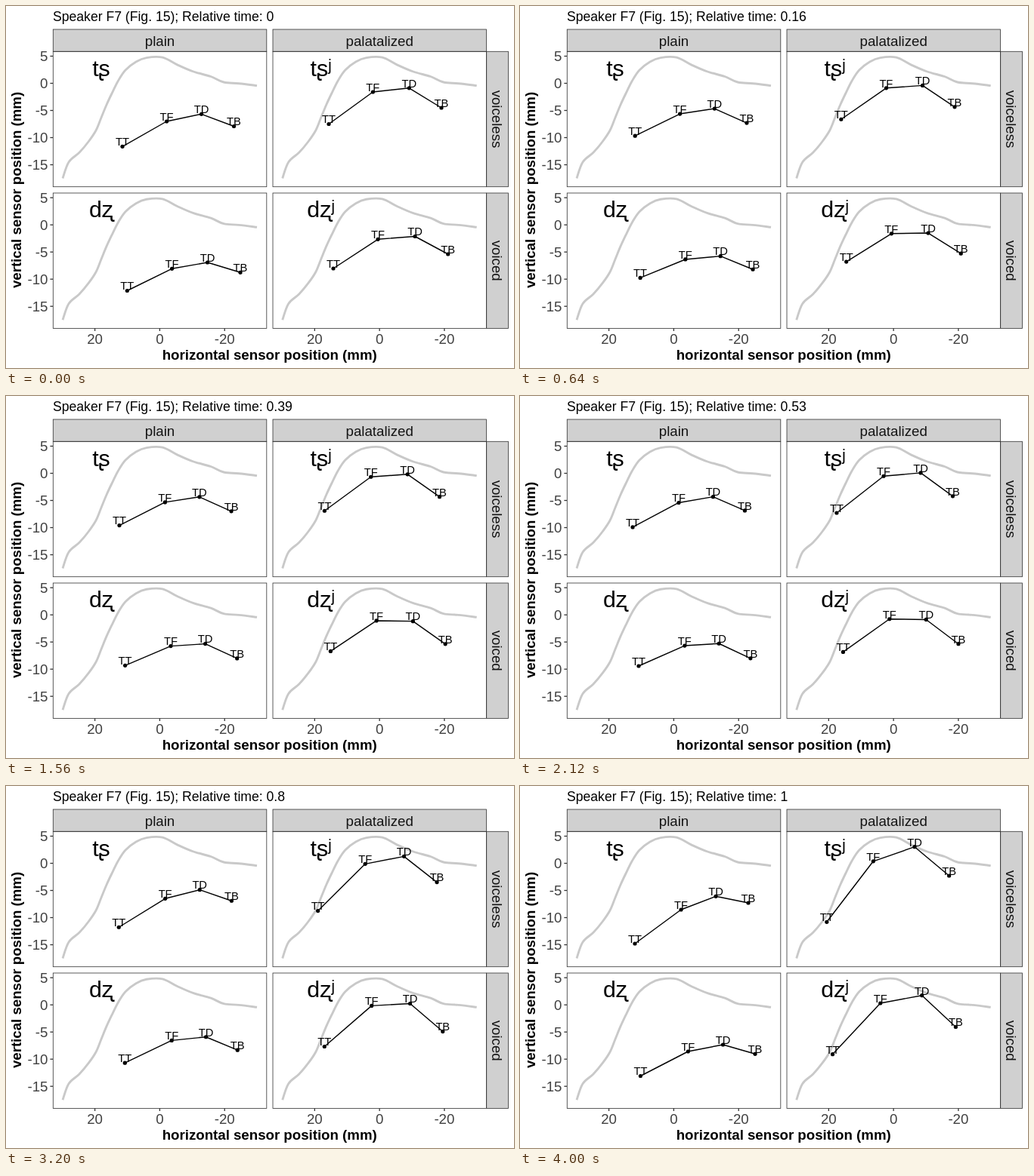
Write an HTML page that moves like this. It is 672x480 px and loops after 4.04 s.

```html
<!DOCTYPE html>
<html lang="en">
<head>
<meta charset="utf-8">
<title>Sensor positions</title>
<style>
  html, body { margin: 0; width: 100%; height: 100%; overflow: hidden; background: #fff; }
  svg { display: block; width: 672px; height: 480px; }
  text { font-family: "Liberation Sans", Arial, sans-serif; font-size: 18.67px; text-anchor: middle; }
  #title { font-size: 17.6px; text-anchor: start; }
  .axis { font-weight: bold; }
  .tick { fill: #404040; }
  .tick.y { text-anchor: end; }
  .strip { fill: #141414; }
  .ipa { font-size: 30.3px; }
  .sensor { font-size: 14.7px; }
  .box { fill: none; stroke: #333; stroke-width: 0.8; }
  .box.head { fill: #d0d0d0; }
  .mark { stroke: #333; stroke-width: 1.3; }
  .palate { fill: none; stroke: #c9c9c9; stroke-width: 2.9; stroke-linejoin: round; }
  .tongue { fill: none; stroke: #000; stroke-width: 1.42; stroke-linejoin: round; }
</style>
</head>
<body>
<svg id="stage" viewBox="0 0 672 480">
  <text id="title" x="62" y="20"></text>
  <text class="axis" x="348.7" y="469">horizontal sensor position (mm)</text>
  <text class="axis" transform="translate(20.3 244) rotate(-90)">vertical sensor position (mm)</text>
</svg>
<script>
const STEP = 40, STEPS = 101;
const COL = 290.7, ROW = 187.7;
const SENSORS = ['TT', 'TF', 'TD', 'TB'];
const stage = document.getElementById('stage');
const title = document.getElementById('title');

function add(tag, attrs, text) {
  const el = document.createElementNS('http://www.w3.org/2000/svg', tag);
  set(el, attrs);
  if (text) el.textContent = text;
  return stage.appendChild(el);
}
function set(el, attrs) {
  for (const key in attrs) el.setAttribute(key, attrs[key]);
}
const box = (x, y, width, height, cls = '') => add('rect', { x, y, width, height, class: 'box ' + cls });
const line = (x1, y1, x2, y2) => add('line', { x1, y1, x2, y2, class: 'mark' });

// Catmull-Rom curve through a few points
function smoothPath(pts) {
  const at = i => pts[Math.max(0, Math.min(pts.length - 1, i))];
  const handle = (i, dir) => at(i).map((v, k) => v + dir * (at(i + 1)[k] - at(i - 1)[k]) / 6);
  return pts.slice(1).reduce((d, pt, i) => d + `C${handle(i, 1)} ${handle(i + 1, -1)} ${pt}`, 'M' + pts[0]);
}

const palate = smoothPath([
  [75, 228.5], [83, 207], [97, 194.3], [109, 180], [119, 165], [126, 148], [133, 131],
  [140, 116], [148.5, 99], [158, 85], [172, 74], [186, 68.6], [207, 68.2], [226, 77.6],
  [248, 87], [271, 93.5], [288, 101], [308, 102.7], [332, 105.6]
]);

// Slow drift: linear plus late acceleration, passing mid halfway and end at 1
const BEND = 3.5, HALF = 0.5 ** BEND;
function drift(start, mid, end, p) {
  const late = ((end - start) / 2 - (mid - start)) / (0.5 - HALF);
  return start + (end - start - late) * p + late * p ** BEND;
}

// The tongue first springs up, most at the tip and least at the back
const SPRING = [1, 0.6, 0.4, 0.2];
const settle = p => Math.exp(-p / 0.06);

// Builds one panel and returns the function that poses its sensors
function panel(col, row, ipa, lift, start, mid, end) {
  const dx = col * COL, dy = row * ROW;
  add('path', { d: palate, class: 'palate', transform: `translate(${dx} ${dy})` });
  add('text', { class: 'ipa', x: 126 + dx, y: 92.6 + dy }, ipa);
  const tongue = add('polyline', { class: 'tongue' });
  const dots = SENSORS.map(() => add('circle', { r: 2.6 }));
  const labels = SENSORS.map(name => add('text', { class: 'sensor' }, name));
  box(62.3 + dx, 60.3 + dy, 282.5, 179.4);
  return p => {
    const pts = SENSORS.map((_, i) => {
      const rise = lift * SPRING[i];
      return [
        drift(start[i][0], mid[i][0], end[i][0], p),
        drift(start[i][1] - rise, mid[i][1], end[i][1], p) + rise * settle(p)
      ];
    });
    set(tongue, { points: pts.join(' ') });
    pts.forEach(([x, y], i) => {
      set(dots[i], { cx: x, cy: y });
      set(labels[i], { x, y: y - 1.2 });
    });
  };
}

['plain', 'palatalized'].forEach((name, i) => {
  box(62.3 + i * COL, 31, 282.5, 29.3, 'head');
  add('text', { class: 'strip', x: 203.5 + i * COL, y: 52.5 }, name);
  for (let v = 20; v >= -20; v -= 20) {
    const x = 203.4 - v * 4.29 + i * COL;
    line(x, 427.4, x, 431);
    add('text', { class: 'tick', x, y: 448 }, String(v));
  }
});
['voiceless', 'voiced'].forEach((name, i) => {
  box(635.7, 60.3 + i * ROW, 28.8, 179.4, 'head');
  add('text', { class: 'strip', transform: `translate(643.3 ${150 + i * ROW}) rotate(90)` }, name);
  for (let v = 5; v >= -15; v -= 5) {
    const y = 102.5 - v * 7.2 + i * ROW;
    line(58.4, y, 62, y);
    add('text', { class: 'tick y', x: 55.4, y: y + 6.6 }, String(v));
  }
});

// Each panel: spring height, then the tongue at the start, middle and end
const poses = [
  panel(0, 0, 'tʂ', 14.5,
    [[154, 186.3], [212.5, 153], [258.5, 143.3], [301.5, 159.5]],
    [[149.2, 173.2], [210, 141.2], [255.5, 133.6], [297.5, 152.1]],
    [[152, 209], [213, 164], [259, 146.3], [302, 155]]),
  panel(1, 0, 'tʂʲ', 8,
    [[427, 156.5], [485.3, 114], [533.3, 108.8], [576, 135]],
    [[419.5, 154.3], [481.4, 106.5], [530.3, 102.4], [572.7, 133.1]],
    [[405.8, 180.3], [467.3, 99.8], [522, 80.7], [567.6, 119]]),
  panel(0, 1, 'dʐ', 16,
    [[160.3, 377.5], [219.5, 348.3], [266.5, 340], [310, 353.3]],
    [[157.1, 357.7], [217.8, 331], [263.2, 328.2], [305, 347.8]],
    [[159.4, 384.5], [222.3, 352], [268.5, 343], [311, 355.3]]),
  panel(1, 1, 'dʐʲ', 9,
    [[433, 348], [492, 309.3], [541, 305.5], [584.7, 329]],
    [[427.9, 339.1], [489, 296.2], [537.5, 297], [580.2, 328.8]],
    [[413.5, 355.7], [476.7, 288], [531.7, 277.7], [576.4, 319.5]])
];

function draw() {
  const p = Math.floor(performance.now() / STEP) % STEPS / 100;
  title.textContent = 'Speaker F7 (Fig. 15); Relative time: ' + p;
  poses.forEach(pose => pose(p));
  requestAnimationFrame(draw);
}
draw();
</script>
</body>
</html>
```
